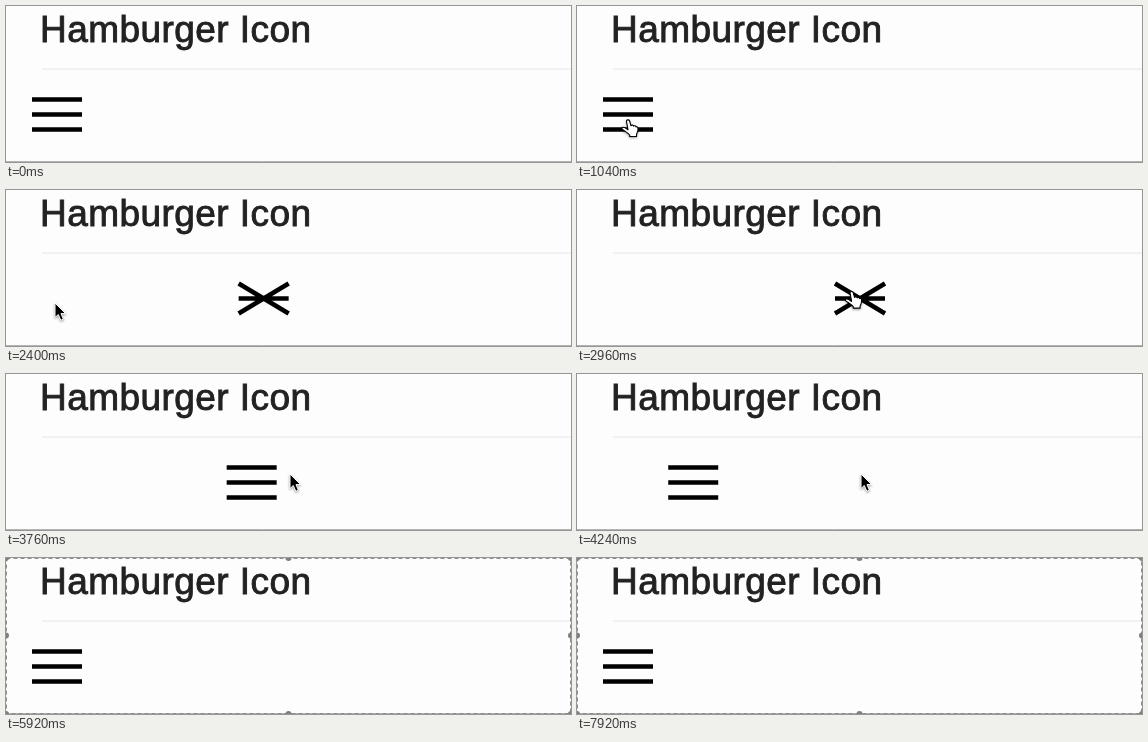
An HTML page for the animation above (8000 ms loop, 565x156 px).

```html
<!DOCTYPE html>
<html lang="en">
<head>
<meta charset="utf-8">
<title>Hamburger Icon</title>
<style>
  html, body { margin: 0; width: 100%; height: 100%; overflow: hidden; background: #fdfdfd; }
  svg { display: block; }
  text { font: 37px "Liberation Sans", Arial, sans-serif; letter-spacing: .45px; fill: #222; stroke: #222; stroke-width: .9; }
  #icon { stroke: #000; stroke-width: 4.6; fill: none; }
  #cursor { filter: drop-shadow(0 1px 1px #0006); stroke-linejoin: round; }
  #arrow { fill: #000; stroke: #fff; stroke-width: 1; }
  #hand { fill: #fff; stroke: #000; stroke-width: 1.1; }
  #selection { fill: none; stroke: #8c8c8c; }
  #selection circle { fill: #808080; stroke: none; }
</style>
</head>
<body>
<svg width="565" height="156" viewBox="0 0 565 156">
  <text x="34" y="36">Hamburger Icon</text>
  <path d="M36 63H565" stroke="#e6e6e6"/>
  <path d="M0 155.5H565" stroke="#b4b4b4"/>
  <path id="icon"/>
  <g id="cursor">
    <path id="arrow" d="M0 0V14.6L3.3 11.5L5.8 17.3L8.4 16.2L6 10.6H10.6Z"/>
    <path id="hand" d="M.5 2.5C.2.6 3 .3 3.6 2L5 6.8C5.8 5.6 7.3 6 7.6 7.2C8.5 6.3 9.8 6.8 10 8C11 7.3 12 8 12 9.5C12.3 12 11.5 13.5 10.5 15.5V17.5H3.7V16C2 14-1.5 12-4 10C-4.6 8-2.4 7.6 0 9.4L2 10.8Z"/>
  </g>
  <g id="selection">
    <rect x=".5" y=".5" width="564" height="155" stroke-dasharray="4 3"/>
  </g>
</svg>
<script>
const LOOP = 8000, STEP = 80, OPEN = 1467, CLOSE = 3421, SLIDE = 1000;
const HOME = 26, TRAVEL = 232, SIZE = 50;
const [icon, cursor, arrow, hand, selection] =
  ["icon", "cursor", "arrow", "hand", "selection"].map(id => document.getElementById(id));

// time, x, y of the pointer tip
const pointerPath = [
  [640, 208, 140], [1040, 49, 113], [2440, 49, 113],
  [3040, 284, 100], [4260, 284, 100], [4560, 290, 120]
];

for (const x of [0, 282.5, 565])
  for (const y of [0, 77.5, 156])
    if (x !== 282.5 || y !== 77.5)
      selection.insertAdjacentHTML("beforeend", `<circle cx="${x}" cy="${y}" r="3"/>`);

const clamp = v => Math.min(1, Math.max(0, v));
const smooth = v => v * v * (3 - 2 * v);

// cubic-bezier(.42, 0, 1, 1)
function easeIn(x) {
  let low = 0, high = 1;
  for (let i = 0; i < 24; i++) {
    const s = (low + high) / 2;
    if (1.26 * s * (1 - s) ** 2 + smooth(s) < x) low = s; else high = s;
  }
  return smooth(low);
}

function pointerAt(t) {
  const next = pointerPath.findIndex(p => p[0] > t);
  if (next < 1) return pointerPath.at(next).slice(1);
  const [t0, x0, y0] = pointerPath[next - 1], [t1, x1, y1] = pointerPath[next];
  const k = smooth((t - t0) / (t1 - t0));
  return [x0 + (x1 - x0) * k, y0 + (y1 - y0) * k];
}

const slide = (t, start) => easeIn(clamp((t - start) / SLIDE));
const show = (el, on) => el.setAttribute("visibility", on ? "visible" : "hidden");

function draw(t) {
  const left = HOME + TRAVEL * (slide(t, OPEN) - slide(t, CLOSE));
  const crossed = t >= OPEN && t < CLOSE;
  const bar = (y1, y2) => `M${left} ${y1}L${left + SIZE} ${y2}`;
  icon.setAttribute("d", bar(108.5, 108.5) +
    (crossed ? bar(93.5, 123.5) + bar(123.5, 93.5) : bar(93.5, 93.5) + bar(123.5, 123.5)));

  const [x, y] = pointerAt(t);
  const visible = t >= 640 && t < 4640;
  const hovering = x >= left && x <= left + SIZE && y > 90 && y < 127;
  cursor.setAttribute("transform", `translate(${x} ${y})`);
  show(arrow, visible && !hovering);
  show(hand, visible && hovering);

  selection.setAttribute("opacity", t < 5840 ? 0 : t < 5920 ? .5 : 1);
}

const begin = performance.now();
function tick() {
  const t = Math.max(0, performance.now() - begin) % LOOP;
  draw(Math.floor(t / STEP) * STEP);
  requestAnimationFrame(tick);
}
tick();
</script>
</body>
</html>
```
